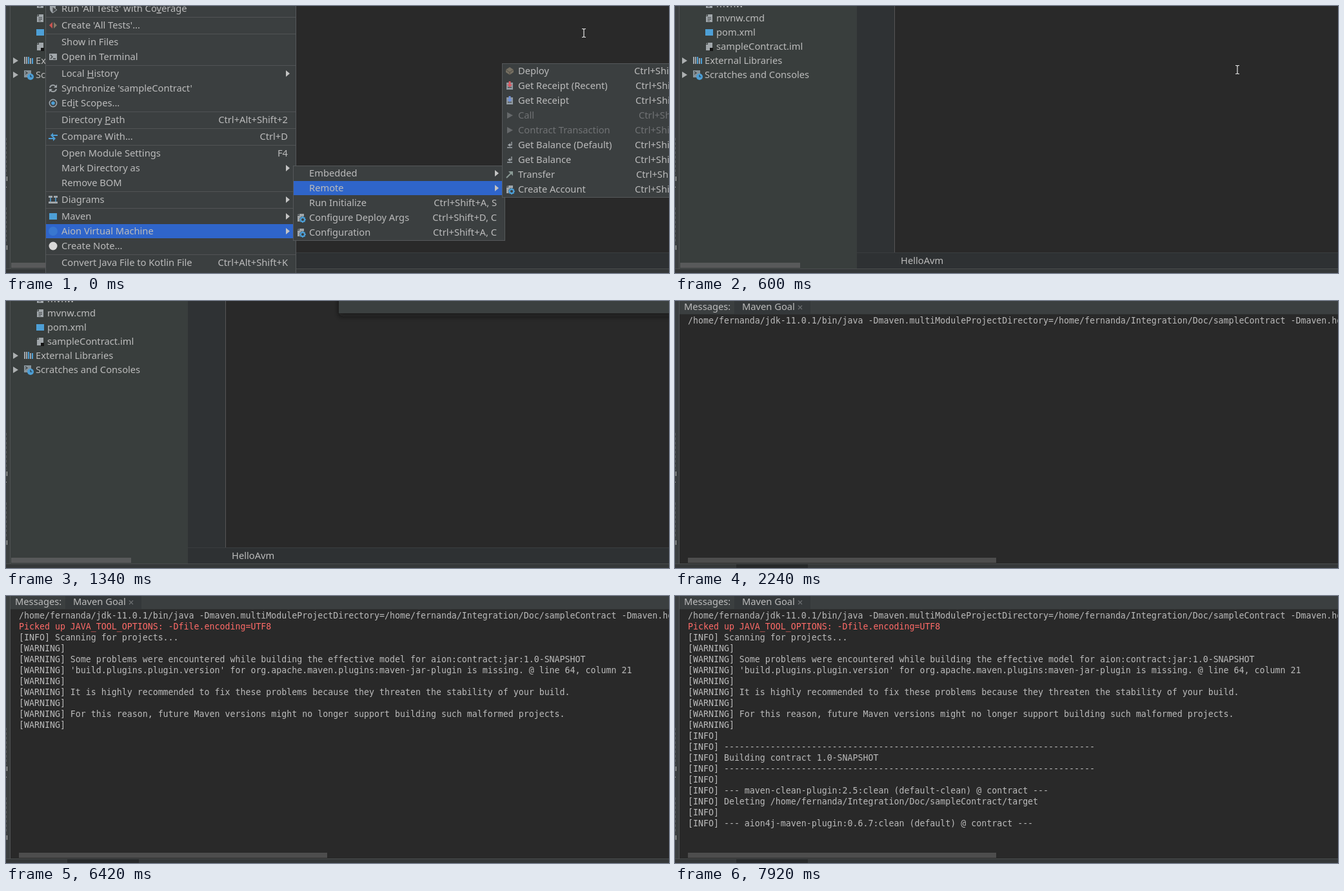
Animation, 1028 px wide and 415 px high, one loop 8000 ms. Source, as an HTML page:

```html
<!DOCTYPE html>
<html lang="en">
<head>
<meta charset="utf-8">
<title>Deploy from the IDE menu</title>
<style>
  html, body { margin: 0; width: 100%; height: 100%; overflow: hidden; background: #292929; }
  svg { display: block; width: 1028px; height: 415px; }
  rect { shape-rendering: crispEdges; }
  text { font: 14.7px "Noto Sans", "Open Sans", sans-serif; fill: #bbb; white-space: pre; }
  .log { font: 13.288px "DejaVu Sans Mono", monospace; }
  .err { fill: #ff6b68; }
  .off { fill: #707274; }
  .key { text-decoration: underline; }
</style>
</head>
<body>
<svg id="stage" viewBox="0 0 1028 415"></svg>
<script>
const LOOP = 8000;
const BLUE = '#2f65ca', PANEL = '#3b3f40', EDITOR = '#292929', LINE = '#515355';
const GREY = '#a0a6aa', SKY = '#4d9fd6';

const rect = (x, y, w, h, fill, extra = '') =>
  `<rect x="${x}" y="${y}" width="${w}" height="${h}" fill="${fill}" ${extra}/>`;
const path = (d, fill, stroke = 'none', width = 1, extra = '') =>
  `<path d="${d}" fill="${fill}" stroke="${stroke}" stroke-width="${width}" ${extra}/>`;
const disc = (r, fill, stroke = 'none', width = 1) =>
  `<circle r="${r}" fill="${fill}" stroke="${stroke}" stroke-width="${width}"/>`;
const at = (x, y, body) => `<g transform="translate(${x} ${y})">${body}</g>`;
const group = (id, body) => `<g id="${id}">${body}</g>`;

// y is the middle of the capitals; an underscore marks the mnemonic letter.
const label = (x, y, str, cls = '', anchor = 'start') =>
  `<text x="${x}" y="${y + 5}" class="${cls}" text-anchor="${anchor}">` +
  str.replace(/_(.)/, '<tspan class="key">$1</tspan>') + '</text>';

// Icons are drawn around 0,0.
const gear = at(3, 3, disc(3.2, 'none', SKY, 2.2) +
  path('M0-5V-3M0 3V5M-5 0H-3M3 0H5M-3.5-3.5L-2-2M2 2L3.5 3.5M3.5-3.5L2-2M-2 2L-3.5 3.5', 'none', SKY, 1.6));
const sheet = path('M-2-6H5V6H-5V-3H-2Z', GREY) + path('M-5-4L-3-6V-4Z', GREY);
const play = path('M-4-5L5 0L-4 5Z', '#66696b');
const balance = path('M3-5V0H-2M4 4H-4M1-2L-2 0L1 2', 'none', GREY, 1.3);
const receipt = arrow => path('M-5-5V6H5V-5', '#8e979e') + rect(-3, 2, 6, 1, PANEL) +
  path('M-1.5-7H1.5V-2H4L0 2.5L-4-2H-1.5Z', arrow);
const icons = {
  doc: sheet + path('M-2.5-1H3M-2.5 1.5H3M-2.5 4H1', 'none', PANEL, 1),
  module: sheet + rect(1, 2, 5, 5, '#151515'),
  square: rect(-6, -5, 12, 10, SKY),
  ring: disc(7, '#3977cf'),
  dot: disc(6.5, '#d8d8d8'),
  books: rect(-7, -6, 2, 11, GREY) + rect(-4, -6, 2, 11, GREY) + rect(-1, -6, 2, 11, SKY) +
    rect(2, -4, 2, 9, GREY) + rect(5, -4, 2, 9, SKY),
  scratch: path('M-7-7H4V4H-7Z', '#87939a') + path('M-5-5L-2-3L-5-1', 'none', PANEL, 1.2) +
    at(3, 3, disc(5, SKY) + path('M0-3V0H2.5', 'none', '#263946', 1.2)),
  cover: path('M-5-6H4V1Q3 5-1 7Q-5 4-5 0Z', GREY) + path('M-1-3L6 2L-1 7Z', '#46494b', GREY, 1),
  tests: path('M-1-5V5L-6 0Z', '#c75450') + path('M1-5V5L6 0Z', '#857b68'),
  term: rect(-6, -5, 12, 10, GREY) + path('M-4-3L-1 0L-4 3M0 3H4', 'none', PANEL, 1.3),
  sync: path('M-5-1A5 5 0 0 1 4-3M5 1A5 5 0 0 1-4 3', 'none', GREY, 1.8) +
    path('M6-6V-1H1ZM-6 6V1H-1Z', GREY),
  scope: disc(5.6, 'none', '#9da5ab', 1.6) + disc(2.8, SKY),
  compare: path('M7-2H-1M-7 3H1', 'none', SKY, 1.8) + path('M0-6V2L-4-2ZM0-1V7L4 3Z', SKY),
  diagram: rect(-7, -6, 6, 3, GREY) + rect(1, -6, 6, 3, GREY) + rect(-7, 3, 14, 3, GREY) +
    path('M-4-3V3M4-3V3', 'none', SKY, 1.5),
  config: sheet + at(3, 3, disc(5, PANEL)) + gear,
  deploy: path('M-6-2L0-6L6-2V2L0 6L-6 2Z', '#756f62') + path('M-6-2L0 2L6-2M0 2V6', 'none', '#504c45'),
  grid: path('M-2-6V6M2-6V6M-6-2H6M-6 2H6', 'none', '#8e8f86', 1.5),
  recent: receipt('#db5860'),
  receipt: receipt('#6f8fd6'),
  play, balance,
  transfer: path('M-5 5L3-3', 'none', '#8a9a95', 2) + path('M-2-5H5V2Z', '#8a9a95')
};
const icon = (name, x, y) => at(x, y, icons[name] || '');

// A menu row is [y, icon, label, shortcut (text, '>' or its left edge), class].
function menu(x, y, w, h, rows, { text, end, pick }) {
  let out = rect(x, y, w, h, '#55585a') + rect(x + 1, y + 1, w - 2, h - 2, PANEL);
  if (pick) out += rect(x + 1, pick - 11, w - 2, 22, BLUE);
  rows.forEach(([ry, pic, name, keys, cls], i) => {
    const next = rows[i + 1];
    if (next && next[0] - ry > 24) out += rect(x + 1, (ry + next[0]) / 2, w - 2, 1, LINE);
    out += icon(pic, text - 13, ry) + label(text, ry, name, cls);
    if (keys === '>') out += at(end, ry, path('M-3-5L3 0L-3 5Z', '#c4c4c4'));
    else if (keys > 0) out += label(keys, ry, 'Ctrl+Shift+A, D', cls);
    else if (keys) out += label(end, ry, keys, cls, 'end');
  });
  return out;
}

const mainRows = [
  [4, 'cover', "Run 'All Tests' with Co_verage"],
  [30, 'tests', "Create 'All Tests'..."],
  [56, '', 'Show in Files'],
  [79, 'term', 'Open in Terminal'],
  [105, '', 'Local _History', '>'],
  [128, 'sync', "Synchronize 'sampleContract'"],
  [151, 'scope', 'Ed_it Scopes...'],
  [177, '', 'Directory _Path', 'Ctrl+Alt+Shift+2'],
  [203, 'compare', 'Compare With...', 'Ctrl+D'],
  [229, '', 'Open Module Settings', 'F4'],
  [252, '', 'Mark Directory as', '>'],
  [275, '', 'Remove BOM'],
  [301, 'diagram', 'Diagrams', '>'],
  [327, 'square', 'Maven', '>'],
  [350, 'ring', 'Aion Virtual Machine', '>'],
  [373, 'dot', 'Create Note...'],
  [399, '', 'Convert Java File to Kotlin File', 'Ctrl+Alt+Shift+K']
];
const vmRows = [
  [260, '', 'Embedded', '>'],
  [283, '', 'Remote', '>'],
  [306, '', 'Run Initialize', 'Ctrl+Shift+A, S'],
  [329, 'config', 'Configure Deploy Args', 'Ctrl+Shift+D, C'],
  [352, 'config', 'Configuration', 'Ctrl+Shift+A, C']
];
const remoteRows = [
  [101, 'deploy', 'Deploy', 974],
  [124, 'recent', 'Get Receipt (Recent)', 976],
  [147, 'receipt', 'Get Receipt', 976],
  [170, 'play', 'Call', 981, 'off'],
  [193, 'play', 'Contract Transaction', 975, 'off'],
  [216, 'balance', 'Get Balance (Default)', 975],
  [239, 'balance', 'Get Balance', 975],
  [262, 'transfer', 'Transfer', 977],
  [285, 'config', 'Create Account', 975]
];
const treeRows = [
  [-3, 'doc', 'mvnw'], [19, 'doc', 'mvnw.cmd'], [41, 'square', 'pom.xml'],
  [63, 'module', 'sampleContract.iml'],
  [85, 'books', 'External Libraries'], [107, 'scratch', 'Scratches and Consoles']
];

const rule = '[INFO] ' + '-'.repeat(72);
const W = '[WARNING]';
const home = '/home/fernanda';
const log = [
  [2240, `${home}/jdk-11.0.1/bin/java -Dmaven.multiModuleProjectDirectory=${home}/Integration/Doc/sampleContract -Dmaven.home=`],
  [2280, 'Picked up JAVA_TOOL_OPTIONS: -Dfile.encoding=UTF8'],
  [6420, '[INFO] Scanning for projects...', W,
    W + ' Some problems were encountered while building the effective model for aion:contract:jar:1.0-SNAPSHOT',
    W + " 'build.plugins.plugin.version' for org.apache.maven.plugins:maven-jar-plugin is missing. @ line 64, column 21", W,
    W + ' It is highly recommended to fix these problems because they threaten the stability of your build.', W,
    W + ' For this reason, future Maven versions might no longer support building such malformed projects.', W],
  [6900, '[INFO]', rule, '[INFO] Building contract 1.0-SNAPSHOT', rule],
  [7500, '[INFO]', '[INFO] --- maven-clean-plugin:2.5:clean (default-clean) @ contract ---'],
  [7920, `[INFO] Deleting ${home}/Integration/Doc/sampleContract/target`, '[INFO]',
    '[INFO] --- aion4j-maven-plugin:0.6.7:clean (default) @ contract ---']
];

function ide() {
  const tree = treeRows.map(([y, pic, name]) => {
    const root = y > 80;
    return (root ? at(15, y, path('M-4-5L4 0L-4 5Z', '#adb0b1')) : '') +
      icon(pic, root ? 35 : 53, y) + label(root ? 46 : 64, y, name);
  }).join('');
  return rect(7, 0, 275, 408, '#393e3d') + tree + rect(8, 399, 186, 8, '#58595a') +
    rect(282, 0, 58, 383, '#2f3234') + rect(340, 0, 1, 383, '#555') +
    rect(282, 383, 746, 25, '#2e3133') + rect(282, 383, 746, 1, '#3a3d3f') +
    label(350, 396, 'HelloAvm');
}

// The left edge shows the clipped rims of two sideways labels.
function frame() {
  return rect(0, 0, 6, 415, PANEL) + rect(6, 0, 1, 408, '#505354') +
    rect(0, 408, 1028, 1, '#4a4d4e') + rect(0, 409, 1028, 6, '#353839') +
    path('M.5 205V262M.5 313V368', 'none', '#595d5e', 1, 'stroke-dasharray="4 3"') +
    rect(1, 265, 1, 7, '#bbb') + rect(0, 281, 1, 1, '#bbb') + rect(1, 372, 1, 7, '#bbb');
}

function consoleView() {
  let row = 0;
  const lines = log.map(([, ...texts], i) => group('log' + i, texts.map(s =>
    `<text class="log${i === 1 ? ' err' : ''}" x="20" y="${35 + 17 * row++}">${s}</text>`).join(''))).join('');
  return rect(7, 0, 1021, 408, EDITOR) + rect(7, 0, 1021, 21, PANEL) + rect(92, 0, 118, 21, '#34383a') +
    rect(7, 20, 1021, 1, '#323536') + label(14, 9, 'Messages:') + label(104, 9, 'Maven Goal') +
    at(194, 10, path('M-3-3L3 3M3-3L-3 3', 'none', '#6c6f71', 1.2)) +
    lines + rect(20, 399, 478, 8, '#4d4d4d') + rect(95, 409, 111, 6, '#27292a');
}

const dialog = rect(516, -40, 540, 59, PANEL, 'filter="url(#shade)"');
const beam = path('M-3-6.5H-1L0-5.5L1-6.5H3M0-5.5V5.5M-3 6.5H-1L0 5.5L1 6.5H3', 'none', '#e4e4e4', 1.2);
const arrow = path('M0 0V15L3.5 11.8L6 17.5L8.5 16.3L6 11H10.5Z', '#111', '#fff', 1.1);

const stage = document.getElementById('stage');
stage.innerHTML =
  `<defs><filter id="shade" x="-10%" y="-50%" width="120%" height="200%">
    <feDropShadow dx="0" dy="5" stdDeviation="4" flood-color="#171717" flood-opacity=".6"/></filter></defs>` +
  rect(0, 0, 1028, 415, EDITOR) + group('ide', ide()) + frame() +
  group('menus',
    menu(61, -20, 389, 460, mainRows, { text: 86, end: 437, pick: 350 }) +
    menu(445, 248, 329, 117, vmRows, { text: 470, end: 761, pick: 283 }) +
    menu(769, 89, 300, 209, remoteRows, { text: 794 }) +
    group('hover', rect(770, 90, 258, 22, BLUE) + icon('grid', 781, 101) +
      label(794, 101, 'Deploy') + label(974, 101, 'Ctrl+Shift+A, D'))) +
  group('dialog', dialog) + group('console', consoleView()) +
  group('beam', beam) + group('arrow', arrow);

// [time, pointer, x, y]
const pointer = [
  [0, 'beam', 896, 42], [100, 'beam', 895, 46], [180, 'beam', 891, 58], [260, 'beam', 885, 72],
  [340, 'beam', 879, 83], [420, 'arrow', 873, 93], [520, 'arrow', 870, 97], [600, 'beam', 872, 99],
  [640, ''], [800, 'beam', 879, 100], [960, 'beam', 878, 84], [1020, 'beam', 876, 60],
  [1080, 'beam', 873, 34], [1140, '']
];
// [time, opacity]
const fade = [[0, 0], [960, .15], [1020, .3], [1080, .45], [1140, .6], [1200, .75], [1260, .9], [1340, 1]];

const $ = id => document.getElementById(id);
const show = (id, on) => { $(id).style.display = on ? '' : 'none'; };
const stepAt = (steps, t) => steps.filter(s => s[0] <= t).pop();

function draw(t) {
  const [, kind, x, y] = stepAt(pointer, t);
  show('ide', t < 2240);
  show('menus', t < 600);
  show('hover', kind === 'arrow');
  show('dialog', t >= 960 && t < 2240);
  $('dialog').style.opacity = stepAt(fade, t)[1];
  show('console', t >= 2240);
  log.forEach(([from], i) => show('log' + i, t >= from));
  for (const id of ['beam', 'arrow']) {
    show(id, id === kind);
    if (id === kind) $(id).setAttribute('transform', `translate(${x} ${y})`);
  }
}

const start = performance.now();
function tick() {
  draw((performance.now() - start) % LOOP);
  requestAnimationFrame(tick);
}
tick();
</script>
</body>
</html>
```
